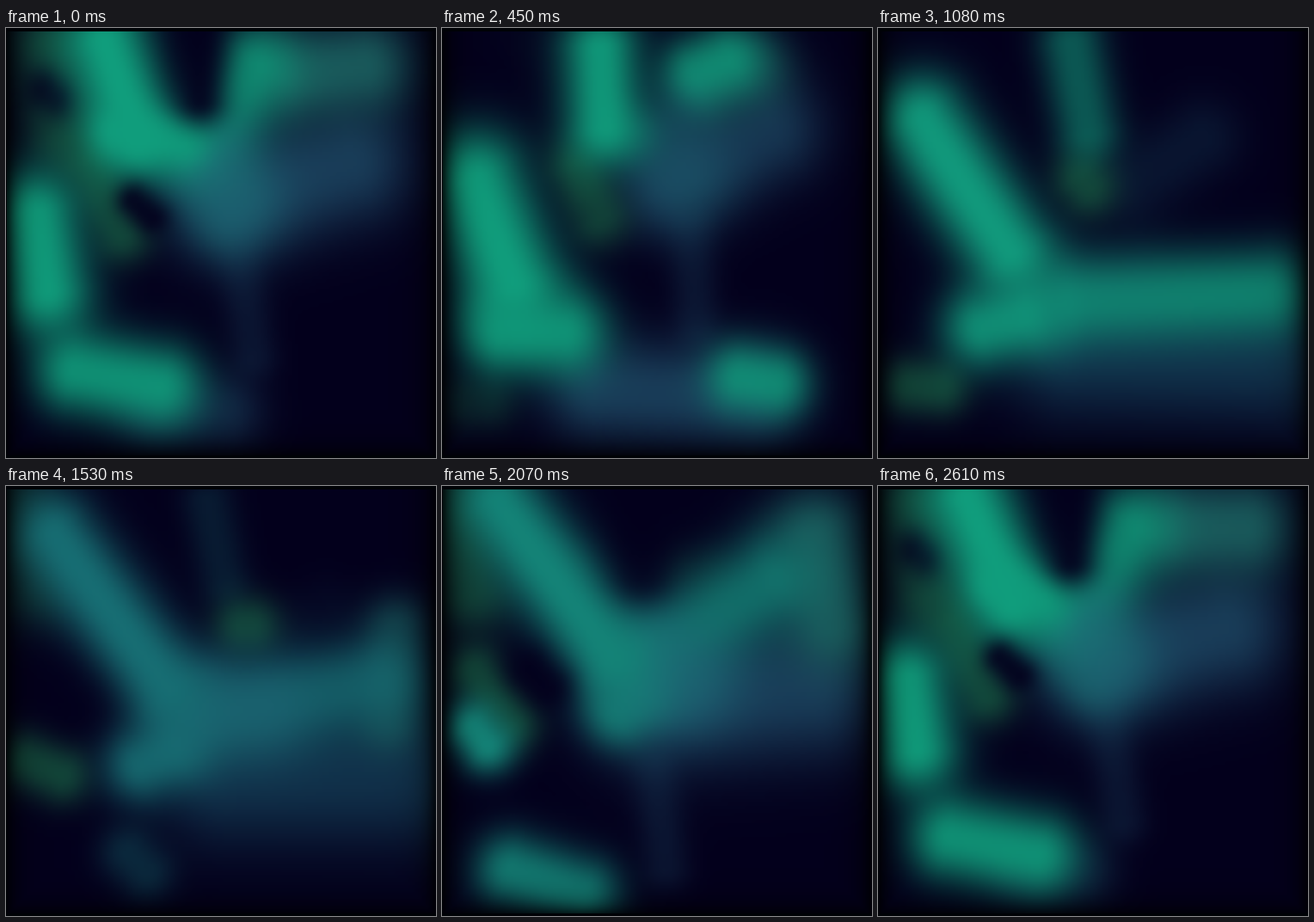
An HTML page with a canvas for the animation above (2700 ms loop, 500 px wide and 500 px high).

```html
<!DOCTYPE html>
<html lang="en">
<head>
<meta charset="utf-8">
<title>Aurora</title>
<style>
  html, body { margin: 0; width: 100%; height: 100%; overflow: hidden; background: #03001c; }
  canvas { display: block; width: 100vw; height: 100vh; }
</style>
</head>
<body>
<canvas id="stage" width="500" height="500"></canvas>
<script>
const STEP = 90, STEPS = 30, SIZE = 500, CELL = 4, GRID = SIZE / CELL;
const NIGHT = [3, 0, 28];

const mix = (a, b, u) => a + (b - a) * u;
const blend = (a, b, u) => a.map((v, k) => mix(v, b[k], u));
const clamp = u => Math.max(0, Math.min(1, u));
const smooth = u => (u = clamp(u), u * u * (3 - 2 * u));
const bump = (x, mid, width) => Math.exp(-(((x - mid) / width) ** 2));

// Colours by step: green turns to petrol late in the loop, blue dims before that.
const tones = {
  bright: s => blend([16, 157, 124], [24, 98, 112], bump(s, 19, 4.5)),
  deep: s => blend([27, 66, 94], [13, 46, 70], bump(s, 14.5, 4)),
  core: () => [29, 100, 116],
  veil: () => [27, 97, 96],
  moss: () => [20, 78, 60],
  night: () => NIGHT
};

// Catmull-Rom curve through evenly timed points.
function along(points, u) {
  const last = points.length - 1;
  const i = Math.max(0, Math.min(last - 1, Math.floor(u * last)));
  const t = u * last - i;
  const at = n => points[Math.max(0, Math.min(last, n))];
  const [p, a, b, q] = [at(i - 1), at(i), at(i + 1), at(i + 2)];
  return a.map((v, k) => v + t / 2 * (b[k] - p[k]
    + t * (2 * p[k] - 5 * v + 4 * b[k] - q[k] + t * (3 * (v - b[k]) + q[k] - p[k]))));
}

// Soft capsules, back to front: life in steps, path of the centre, half-length
// vector, radius, peak opacity, steps to fade in and out.
// A life may outlast the loop; each blob then takes over from its predecessor.
const blobs = [
  { // blue body, floor to upper right
    tone: 'deep', life: [26, 82], peak: .9, fade: [7, 22],
    path: [[185, 455], [245, 435], [332, 395], [370, 335], [341, 228], [328, 172], [322, 142], [348, 160], [348, 110]],
    reach: [[15, 0], [118, 5], [84, -8], [52, -32], [10, 0]],
    radius: [[30], [58], [72], [62], [42], [22]]
  },
  { // thin tail under the centre
    tone: 'deep', life: [17, 42], peak: .3, fade: [6, 6],
    path: [[212, 405], [255, 385], [275, 310], [295, 288], [315, 285]],
    reach: [[0, 35], [12, 75], [-10, 30]],
    radius: [[24]]
  },
  { // upper right veil
    tone: 'veil', life: [40, 70], peak: .9, fade: [12, 9],
    path: [[475, 305], [452, 235], [452, 125], [400, 52], [340, 58], [360, 45]],
    reach: [[-5, 5], [0, 65], [38, -5], [10, -5]],
    radius: [[28], [34], [52], [46], [30]]
  },
  { // mossy streak, lower left to middle
    tone: 'moss', life: [32, 86], peak: .85, fade: [6, 10],
    path: [[35, 431], [54, 428], [45, 278], [108, 202], [202, 189], [280, 162], [300, 80]],
    reach: [[10, 0], [20, 5], [20, 42], [4, 4], [10, 0]],
    radius: [[30]]
  },
  { // top left haze
    tone: 'moss', life: [43, 66], peak: .8, fade: [7, 6],
    path: [[28, 65], [20, 72], [44, 72], [120, 70]],
    reach: [[10, 50]],
    radius: [[42]]
  },
  { // shadow inside the haze
    tone: 'night', life: [53, 69], peak: .85, fade: [5, 5],
    path: [[25, 92], [48, 78], [65, 72], [85, 70]],
    reach: [[5, 3], [8, 5], [28, 22]],
    radius: [[24], [24], [40]]
  },
  { // lower left glow, later the heart of the picture
    tone: 'bright', life: [14, 63], peak: .9, fade: [7, 12],
    path: [[175, 418], [121, 464], [137, 428], [106, 354], [145, 342], [188, 300], [240, 220], [268, 208]],
    reach: [[0, 10], [50, 13], [28, -4], [15, -10], [5, -16]],
    radius: [[26], [42], [44], [36], [34]]
  },
  { // right arm, swinging up
    tone: 'bright', life: [30, 72], peak: .8, fade: [5, 6],
    path: [[320, 440], [372, 400], [342, 312], [325, 234], [308, 142], [259, 95], [324, 38], [345, 20]],
    reach: [[20, 0], [25, 3], [112, -4], [100, -24], [62, -48], [29, -50], [16, -2], [5, 0]],
    radius: [[30], [44], [50], [42], [30]]
  },
  { // teal joint of the two arms
    tone: 'core', life: [40, 70], peak: .7, fade: [10, 8],
    path: [[265, 295], [272, 235], [258, 185], [290, 120]],
    reach: [[30, 0], [5, 25]],
    radius: [[50]]
  },
  { // left arm, tipping from the wall over the top
    tone: 'bright', life: [20, 84], peak: 1, fade: [2, 22],
    path: [[50, 300], [34, 270], [64, 232], [112, 168], [130, 114], [134, 72], [218, 71], [242, 66], [255, 56]],
    reach: [[10, 0], [8, 45], [50, 75], [70, 92], [6, 46], [10, 50], [8, 36]],
    radius: [[24], [52], [44], [46], [34], [18]]
  },
  { // highlight at its tip
    tone: 'bright', life: [52, 66], peak: .95, fade: [4, 4],
    path: [[130, 85], [161, 108], [172, 128], [215, 118]],
    reach: [[10, 5], [6, 8], [45, 3], [8, 6]],
    radius: [[28]]
  },
  { // gap between the arms
    tone: 'night', life: [50, 66], peak: .9, fade: [5, 5],
    path: [[238, 65], [224, 45], [238, 20]],
    reach: [[0, 45]],
    radius: [[27]]
  },
  { // hollow beside the left arm
    tone: 'night', life: [44, 66], peak: .85, fade: [6, 5],
    path: [[58, 250], [101, 230], [151, 210], [185, 228]],
    reach: [[11, 10]],
    radius: [[30], [26], [18], [18]]
  }
];

const ctx = document.getElementById('stage').getContext('2d');
const small = document.createElement('canvas');
small.width = small.height = GRID;
const smallCtx = small.getContext('2d');
const image = smallCtx.createImageData(GRID, GRID);
const field = new Float32Array(GRID * GRID * 3);

function paint({ tone, life: [born, end], peak, fade, path, reach, radius }, step, now) {
  if (now <= born || now >= end) return;
  const u = (now - born) / (end - born);
  const alpha = peak * smooth((now - born) / fade[0]) * smooth((end - now) / fade[1]);
  const color = tones[tone](step);
  const [cx, cy] = along(path, u), [r] = radius[1] ? along(radius, u) : radius[0];
  const [dx, dy] = reach[1] ? along(reach, u) : reach[0];
  const len = dx * dx + dy * dy || 1;
  for (let j = 0, p = 0; j < GRID; j++) {
    for (let i = 0; i < GRID; i++, p += 3) {
      const x = (i + .5) * CELL - cx, y = (j + .5) * CELL - cy;
      const t = Math.max(-1, Math.min(1, (x * dx + y * dy) / len));
      const d = Math.hypot(x - t * dx, y - t * dy) / r;
      if (d > 2.6) continue;
      const w = alpha * Math.exp(-.69 * d ** 2.2);
      for (let k = 0; k < 3; k++) field[p + k] = mix(field[p + k], color[k], w);
    }
  }
}

function draw(step) {
  for (let p = 0; p < field.length; p++) field[p] = NIGHT[p % 3];
  for (const blob of blobs) {
    for (let now = step; now < blob.life[1]; now += STEPS) paint(blob, step, now);
  }
  // Side and bottom edges sink into black.
  for (let n = 0; n < GRID * GRID; n++) {
    const x = n % GRID, y = Math.floor(n / GRID);
    const edge = Math.min(x, GRID - 1 - x, GRID - 1 - y) * CELL;
    const light = 1 - Math.exp(-(edge + 4) / 14);
    for (let k = 0; k < 3; k++) image.data[n * 4 + k] = field[n * 3 + k] * light;
    image.data[n * 4 + 3] = 255;
  }
  smallCtx.putImageData(image, 0, 0);
  ctx.imageSmoothingQuality = 'high';
  ctx.drawImage(small, 0, 0, SIZE, SIZE);
  ctx.fillStyle = '#000206';
  ctx.fillRect(0, 0, SIZE, 4);
  ctx.fillRect(0, SIZE - 3, SIZE, 3);
  ctx.fillRect(0, 0, 1, SIZE);
}

let shown = -1;
const start = performance.now();
function tick() {
  const step = Math.floor((performance.now() - start) / STEP) % STEPS;
  if (step !== shown) draw(shown = step);
  requestAnimationFrame(tick);
}
tick();
</script>
</body>
</html>
```
